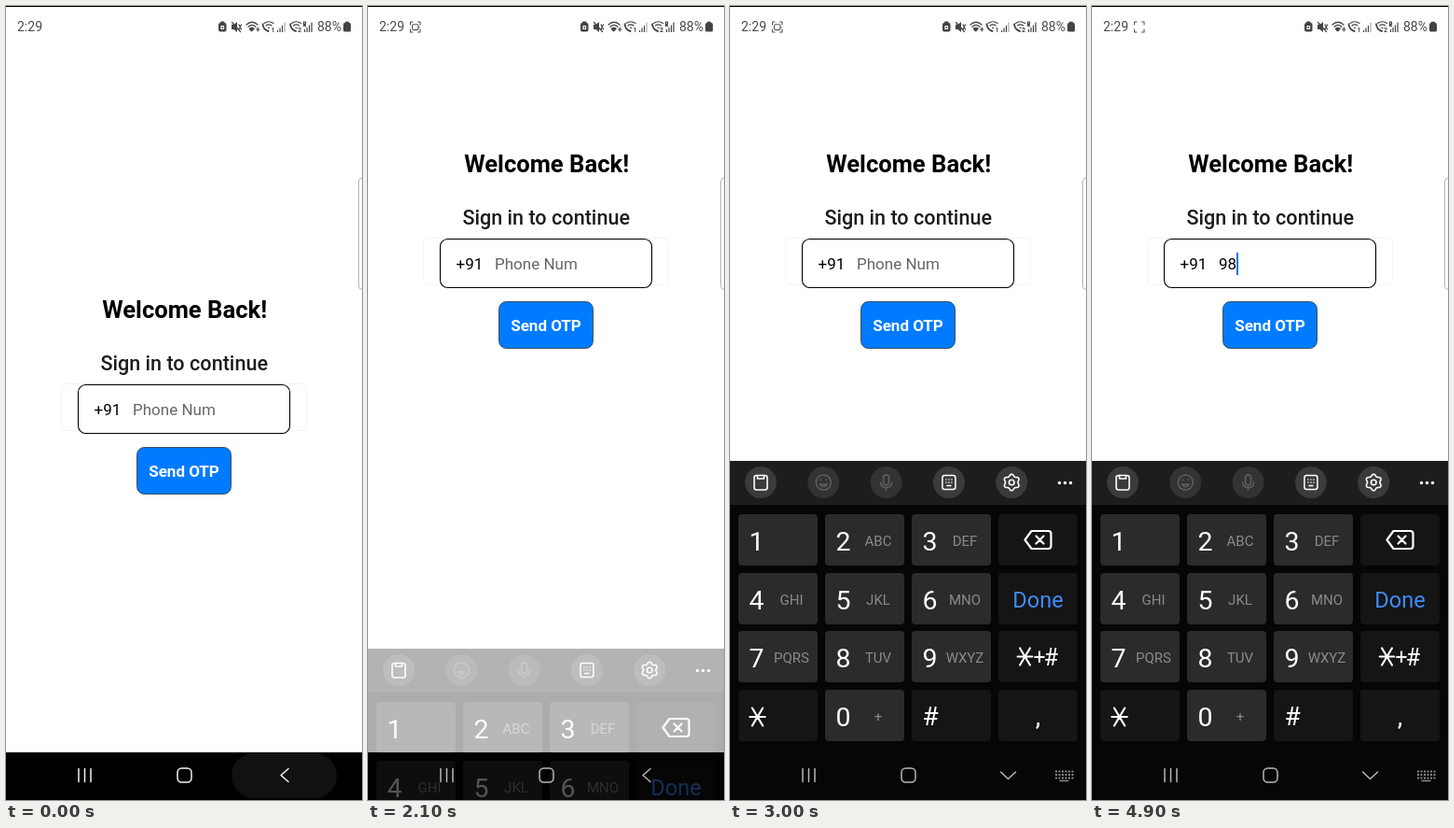
Animation, 382 px wide and 850 px high, one loop 5000 ms. Source, as an HTML page:

```html
<!DOCTYPE html>
<html lang="en">
<head>
<meta charset="utf-8">
<title>Sign in</title>
<style>
  html, body { margin: 0; width: 100%; height: 100%; overflow: hidden; background: #fff; }
  svg { display: block; width: 100%; height: 100%; font-family: Roboto, sans-serif; }
  .mid { text-anchor: middle; }
  .line { fill: none; stroke-linecap: round; stroke-linejoin: round; }
</style>
</head>
<body>
<svg viewBox="0 0 382 850">
  <rect width="382" height="850" fill="#fff"/>
  <rect width="382" height="1" fill="#000"/>

  <!-- status bar -->
  <g fill="#4a4a4a" font-size="14">
    <text x="12" y="27">2:29</text>
    <text x="334" y="27">88%</text>
  </g>
  <g id="capture" class="line" stroke="#555" stroke-width="1.1">
    <path d="M48 17H45.500V20M53.500 17H56V20M45.500 25V28H48M56 25V28H53.500"/>
    <g id="lens"><rect x="47.500" y="19.800" width="6.500" height="5.800" rx="1.500"/><path d="M54 22.700H55"/></g>
  </g>
  <g fill="#444">
    <rect x="228" y="18" width="8.500" height="9.500" rx="2"/>
    <rect x="230" y="16.500" width="4.500" height="2" rx=".8"/>
    <path d="M242 20H244.500L248 17V28L244.500 25H242Z"/>
    <rect x="362" y="18" width="8" height="9.500" rx="1.500"/>
    <rect x="364" y="16.800" width="4" height="2"/>
    <path d="M262 26.500L260.500 24Q264 21.500 267 24L264 27.500Z"/>
  </g>
  <g class="line" stroke="#444" stroke-width="1.200">
    <path stroke="#fff" d="M231 21.500H233.500V24.500H231Z"/>
    <path d="M250 20L252.500 25M252.500 20L250 25M242.500 17.500L251.500 27.500"/>
    <path d="M258 20Q264 14.500 270 20M260 22.300Q264 18.500 268 22.300M268.500 25H272M270.300 23.200V27"/>
    <g id="call">
      <path stroke-width="1.900" d="M275.500 19.500Q276 25 281.500 27"/>
      <path d="M277 18.500Q282 15 287 18.500M279 21Q282 18.800 285 21M281.500 23.300H282.500"/>
    </g>
    <use href="#call" x="29.500"/>
    <path stroke-linecap="butt" d="M291.500 28V26M294 28V23.500M296.500 28V21"/>
    <path stroke="#aaa" stroke-linecap="butt" d="M299 28V17.500"/>
    <path stroke-linecap="butt" d="M320.500 28V25M323 28V23M325.500 28V20.500M328 28V17.500M319.500 22V17H321.500V19.500H319.500L322 22"/>
  </g>
  <g fill="#444" font-size="7" font-weight="700"><text x="284.500" y="28">1</text><text x="313" y="28">2</text></g>

  <!-- form -->
  <g id="form">
    <text class="mid" x="191.700" y="334" font-size="25.600" font-weight="700">Welcome Back!</text>
    <text class="mid" x="191.200" y="390" font-size="21.600" font-weight="500" fill="#1c1b1f">Sign in to continue</text>
    <rect x="59.500" y="404.500" width="263" height="50" rx="5" fill="none" stroke="#f3f3f3"/>
    <rect x="77.500" y="405.500" width="227" height="52" rx="8" fill="#fff" stroke="#000" stroke-width="1.100"/>
    <text x="94.500" y="438" font-size="17">+91</text>
    <text id="entry" x="136" y="438" font-size="17"></text>
    <rect id="caret" y="420" width="2" height="24" fill="#1976d2"/>
    <rect x="140.500" y="472.500" width="101" height="50" rx="8" fill="#007bff" stroke="#3a4652" stroke-width=".9"/>
    <text class="mid" x="191" y="504" font-size="17" font-weight="700" fill="#fff">Send OTP</text>
  </g>
  <rect x="378.500" y="184" width="12" height="119.500" rx="4" fill="#fff" stroke="#b4b4b4"/>

  <!-- keyboard and navigation -->
  <rect y="799" width="382" height="51"/>
  <g id="board">
    <rect y="487" width="382" height="570" fill="#060606"/>
    <rect y="487" width="382" height="47" fill="#1d1d1d"/>
    <g id="tools"></g>
    <g id="keys"></g>
  </g>
  <rect id="ripple" x="242" y="800" width="113" height="48" rx="24" fill="#111"/>
  <g id="nav" class="line" stroke-width="1.500">
    <path d="M78 816.500V830.500M84.500 816.500V830.500M91 816.500V830.500"/>
    <rect x="184" y="816" width="15" height="15" rx="4.500"/>
    <path id="back" d="M303 816.500L295 823.500L303 830.500"/>
    <g id="hide">
      <path d="M290.500 820L298.500 827.500L306.500 820"/>
      <path stroke-linecap="butt" stroke-width="1.800" stroke-dasharray="2 1.500" stroke="#888" d="M349 819.500H368.500M349 823H368.500M349 826.500H368.500"/>
      <path stroke="#888" d="M354 829.500H363"/>
    </g>
  </g>
</svg>
<script>
const $ = id => document.getElementById(id);
const label = (x, y, size, text, fill = '#fff') =>
  `<text class="mid" x="${x}" y="${y}" font-size="${size}" fill="${fill}">${text}</text>`;
const stroke = (d, width = 2, color = '#fff') =>
  `<path class="line" d="${d}" stroke="${color}" stroke-width="${width}"/>`;
const star = (x, y, r) => {
  const w = r * 0.78, a = r * 0.54, b = r * 0.9;
  return stroke(`M${x - w} ${y}H${x + w}M${x - a} ${y - b}L${x + a} ${y + b}M${x + a} ${y - b}L${x - a} ${y + b}`, 2.2);
};

// toolbar
const glyphs = [
  stroke('M-4.500 -7.500H4.500Q7 -7.500 7 -5V5.500Q7 8 4.500 8H-4.500Q-7 8 -7 5.500V-5Q-7 -7.500 -4.500 -7.500M-3.500 -7.500V-4H3.500V-7.500', 1.6),
  stroke('M-8 0A8 8 0 1 0 8 0A8 8 0 1 0 -8 0M-4 2Q0 7 4 2ZM-3 -3V-2.500M3 -3V-2.500', 1.5, '#606060'),
  stroke('M-3 -5A3 3 0 0 1 3 -5V0A3 3 0 0 1 -3 0ZM-6 0Q-6 5.500 0 5.500Q6 5.500 6 0M0 5.500V8', 1.5, '#606060'),
  stroke('M-4.500 -7.500H4.500Q7 -7.500 7 -5V5Q7 7.500 4.500 7.500H-4.500Q-7 7.500 -7 5V-5Q-7 -7.500 -4.500 -7.500M-2 3.500H2', 1.5) +
    stroke('M-3 -3H-2.900M0 -3H.1M3 -3H3.100M-3 0H-2.900M0 0H.1M3 0H3.100', 1.5),
  stroke(Array.from({ length: 48 }, (_, i) => {
    const a = i * Math.PI / 24, r = 7.700 + 1.100 * Math.cos(6 * a);
    return `${i ? 'L' : 'M'}${(r * Math.sin(a)).toFixed(2)} ${(r * Math.cos(a)).toFixed(2)}`;
  }).join('') + 'Z', 1.6) + '<circle r="2.800" fill="none" stroke="#fff" stroke-width="1.600"/>'
];
$('tools').innerHTML = glyphs.map((g, i) =>
  `<g transform="translate(${33 + 67.300 * i} 510)"><circle r="17" fill="${i == 1 || i == 2 ? '#333' : '#3b3b3b'}"/>${g}</g>`
).join('') + [353.500, 359.500, 365.500].map(x => `<circle cx="${x}" cy="510.500" r="1.700" fill="#fff"/>`).join('');

// keypad
const rows = ['1 2 3 del', '4 5 6 done', '7 8 9 sym', '* 0 # ,'];
const letters = { 2: 'ABC', 3: 'DEF', 4: 'GHI', 5: 'JKL', 6: 'MNO', 7: 'PQRS', 8: 'TUV', 9: 'WXYZ', 0: '+' };
const special = {
  del: (x, y) => stroke(`M${x - 14} ${y}L${x - 7} ${y - 9.500}H${x + 11}Q${x + 14} ${y - 9.500} ${x + 14} ${y - 6.500}V${y + 6.500}Q${x + 14} ${y + 9.500} ${x + 11} ${y + 9.500}H${x - 7}ZM${x - 2} ${y - 4}L${x + 6} ${y + 4}M${x + 6} ${y - 4}L${x - 2} ${y + 4}`, 2.2),
  done: (x, y) => label(x, y + 9.500, 23.5, 'Done', '#3f8cff'),
  sym: (x, y) => star(x - 14, y, 10) + label(x + 1.500, y + 8.500, 23, '+') + label(x + 14, y + 9, 25, '#'),
  '*': (x, y) => star(x - 22, y + 1.500, 10.500),
  '#': (x, y) => label(x - 22.500, y + 10.500, 28, '#'),
  ',': (x, y) => label(x, y + 10, 28, ',')
};
$('keys').innerHTML = rows.map((row, j) => row.split(' ').map((k, i) => {
  const x = 9 + 93 * i, y = Math.round(544 + 62.600 * j), draw = special[k];
  const face = draw ? draw(x + 42.500, y + 27.500)
    : label(x + 19.500, y + 38.500, 28.5, k) + label(x + 57, y + 33.500, 15, letters[k] || '', '#8a8a8a');
  return `<rect id="key${k}" x="${x}" y="${y}" width="85" height="55" rx="4" fill="${draw ? '#151515' : '#2b2b2b'}"/>${face}`;
}).join('')).join('');

const show = (id, on) => $(id).setAttribute('opacity', +on);
const press = (k, on) => $('key' + k).setAttribute('fill', on ? '#484848' : '#2b2b2b');

function render(ms) {
  const t = Math.floor(ms / 100) * 100;      // the screen refreshes ten times a second
  const open = t >= 2100, settled = t >= 2200;
  const odd = Math.floor(t / 500) % 2 == 1;  // half-second blink

  show('ripple', Math.max(0, 1 - t / 300));
  show('capture', Math.min(1, t / 300));
  show('lens', !odd);
  $('nav').setAttribute('stroke', t < 300 ? '#f4f4f4' : '#b8b8b8');

  $('form').setAttribute('transform', `translate(0 ${open ? -156 : 0})`);
  const drop = Math.round(201 * Math.exp((2100 - t) / 45));
  $('board').setAttribute('transform', `translate(0 ${open ? drop : 400})`);
  show('board', open ? (settled ? 1 : 0.33) : 0);
  show('back', !settled);
  show('hide', settled);

  const typed = t >= 4800 ? '98' : t >= 4600 ? '9' : '';
  $('entry').textContent = typed || 'Phone Num';
  $('entry').setAttribute('fill', typed ? '#000' : '#666');
  $('caret').setAttribute('x', 136 + 9.500 * typed.length);
  show('caret', settled && odd);
  press(9, t == 4500);
  press(8, t == 4700);
}

const start = performance.now();
function tick() {
  render((performance.now() - start) % 5000);
  requestAnimationFrame(tick);
}
tick();
</script>
</body>
</html>
```
